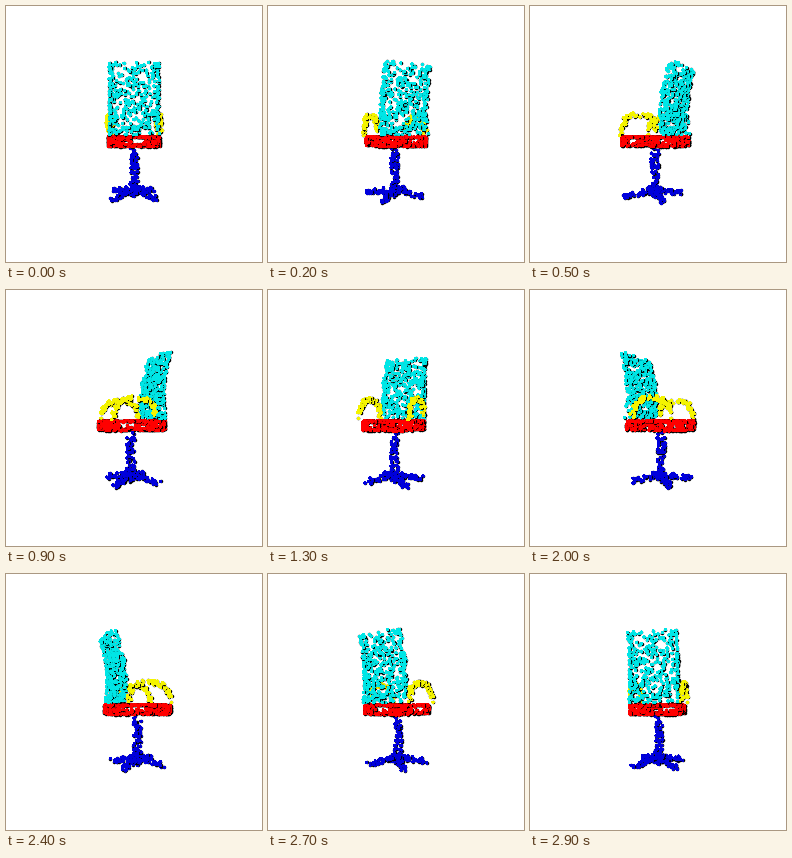
These frames come from a looping animation (256x256 px, 3000 ms). A matplotlib script:

```python
import numpy as np
import matplotlib.pyplot as plt
from matplotlib.animation import FuncAnimation

SIZE, DPI = 256, 100
FRAMES, INTERVAL = 30, 100
CENTER = 128      # screen position of the turning axis and the horizon
EYE = 273         # camera distance
LAYERS = 10       # depth slices, drawn far to near
CYAN, RED, YELLOW, BLUE = "#00e6e6", "#ff0000", "#f4f400", "#0000dc"

rng = np.random.default_rng(11)


def stack(x, y, z):
    """Points as rows: x sideways, y below the horizon, z towards the back."""
    return np.column_stack(np.broadcast_arrays(x, y, z)).astype(float)


def tube(start, end, radius, n):
    """Points scattered around the segment from start to end."""
    t = rng.uniform(0, 1, (n, 1))
    d = rng.normal(size=(n, 3))
    d *= radius / np.linalg.norm(d, axis=1, keepdims=True)
    return np.array(start) * (1 - t) + np.array(end) * t + d


def backrest():
    n_face, n_side = 300, 110
    n = n_face + n_side
    x = np.r_[rng.uniform(-23, 23, n_face),
              rng.choice([-1, 1], n_side) * rng.uniform(21.5, 23, n_side)]
    t = rng.uniform(0, 1, n)
    depth = np.r_[rng.choice([-1, 1], n_face), rng.uniform(-1, 1, n_side)]
    z = 20 - 3 * np.sin(np.pi * t) + 7 * t ** 1.6 + depth * (4.5 - t)
    return stack(x, 1 - 65.5 * t, z)


def seat():
    n_face, n_rim = 230, 190
    n = n_face + n_rim
    a = rng.uniform(0, 2 * np.pi, n)
    r = np.r_[np.sqrt(rng.uniform(0, 1, n_face)), np.ones(n_rim)]
    c, s = np.cos(a), np.sin(a)
    x = 25 * r * np.sign(c) * np.abs(c) ** 0.5
    z = -3 + 31 * r * np.sign(s) * np.abs(s) ** 0.5
    y = np.r_[rng.choice([3, 11.5], n_face), rng.uniform(3, 11.5, n_rim)]
    return stack(x, y, z)


def arm(side, n=75):
    a = rng.uniform(0, np.pi, n)
    c, s = np.cos(a), np.sin(a)
    z = -7 + 20 * np.sign(c) * np.abs(c) ** 0.75
    y = 1 - 19 * s ** 0.75
    return stack(side * 25, y, z) + rng.uniform(-2.2, 2.2, (n, 3))


def base():
    hub = np.array([0, 56, -3.5])
    parts = [tube((0, 16, -3.5), (0, 53, -3.5), 4, 55),
             tube(hub, hub + [0, 3, 0], 4.5, 28)]
    for k in range(4):
        a = np.pi / 4 + k * np.pi / 2
        tip = hub + [30 * np.sin(a), 5, 30 * np.cos(a)]
        parts.append(tube(hub, tip, 2.8, 36))
    return np.vstack(parts)


parts = [(backrest(), CYAN), (seat(), RED), (arm(-1), YELLOW),
         (arm(1), YELLOW), (base(), BLUE)]
cloud = np.vstack([p for p, _ in parts])
colors = np.concatenate([[c] * len(p) for p, c in parts])

fig = plt.figure(figsize=(SIZE / DPI, SIZE / DPI), dpi=DPI, facecolor="white")
ax = fig.add_axes([0, 0, 1, 1])
ax.set(xlim=(0, SIZE), ylim=(SIZE, 0))
ax.axis("off")


def dots(diameter, color, zorder):
    return ax.scatter([], [], s=(diameter * 72 / DPI) ** 2, c=color,
                      linewidths=0, antialiased=False, zorder=zorder)


# Each slice has dark discs below and coloured ones above them.
layers = [(dots(3.5, "black", 2 * k), dots(2.4, "white", 2 * k + 1))
          for k in range(LAYERS)]


def project(angle):
    x, y, z = cloud.T
    c, s = np.cos(angle), np.sin(angle)
    across, near = x * c + z * s, z * c - x * s
    scale = EYE / (EYE - near)
    return np.column_stack([across, y]) * scale[:, None] + CENTER, near


def update(i):
    pos, near = project(2 * np.pi * i / FRAMES)
    slices = np.array_split(np.argsort(near), LAYERS)
    for (rim, fill), idx in zip(layers, slices):
        rim.set_offsets(pos[idx])
        fill.set_offsets(pos[idx])
        fill.set_facecolor(colors[idx])
    return [d for pair in layers for d in pair]


anim = FuncAnimation(fig, update, frames=FRAMES, interval=INTERVAL,
                     repeat=True, repeat_delay=0)
plt.show()
```
